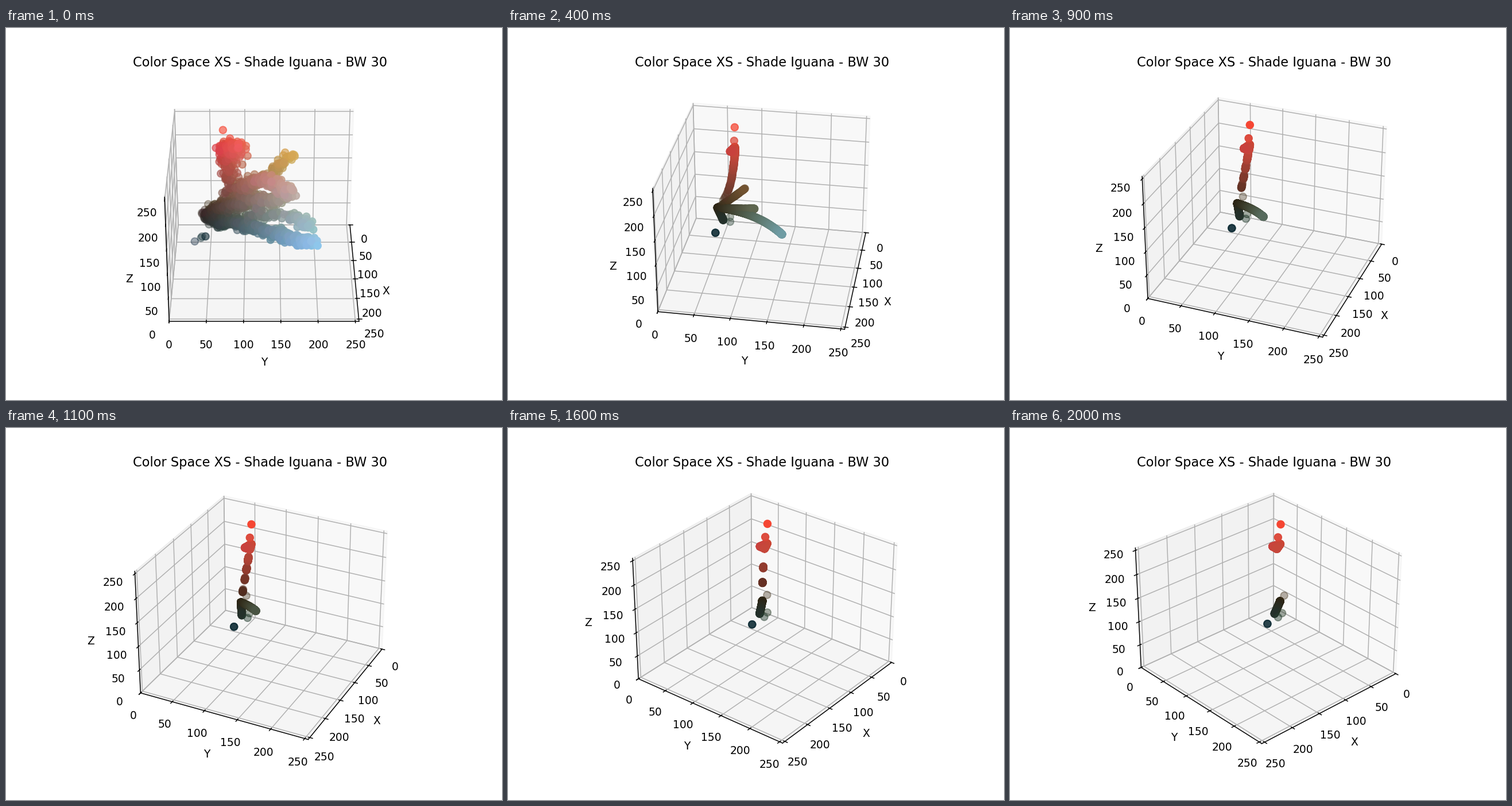
Animation, 864 px wide and 648 px high, one loop 2.1 s. Source, as a matplotlib script:

```python
import numpy as np
import matplotlib.pyplot as plt
from matplotlib.animation import FuncAnimation

FRAMES = 21
rng = np.random.default_rng(7)

# Colours are (R, G, B); a point sits at x=B, y=G, z=R.
DARK = (45, 37, 21)
BLUE_PATH = DARK, (98, 120, 93), (118, 172, 193)
GRAY_PATH = DARK, (78, 82, 66), (128, 144, 112)
GOLD_PATH = DARK, (105, 78, 52), (176, 123, 65)
RED_PATH = DARK, (101, 46, 34), (198, 72, 60)
SHADE_PATH = DARK, (40, 44, 33), (36, 50, 44)


def bezier(path, s):
    a, b, c = np.array(path, float)
    s = s[:, None]
    return (1 - s) ** 2 * a + 2 * s * (1 - s) * b + s ** 2 * c


def scatter(n, size):
    """Noise that is partly shared by the channels, as in brightness."""
    return size * (.7 * rng.normal(size=(n, 1)) + .7 * rng.normal(size=(n, 3)))


def spread(t):
    """Share of the starting scatter that is left at step t."""
    return np.exp(-1.15 * t)


def arm(s, noise, start, path, life=np.inf):
    """Points that fall onto a path, then slide to its dark end."""
    offset = bezier(start, s) + scatter(len(s), noise) - bezier(path, s)

    def at(t):
        reach = np.clip(1 - (t - 2) / life, 0, 1)
        return bezier(path, s * reach) + spread(t) * offset
    return at


def cluster(n, center, noise, corners):
    """Points that gather inside a small triangle of colours."""
    goal = rng.dirichlet([.5] * 3, n) @ np.array(corners, float)
    offset = center + scatter(n, noise) - goal
    return lambda t: goal + spread(t) * offset


def stem(n):
    """Beads below the red cluster; the lower ones drop sooner."""
    top = rng.choice(np.linspace(.4, 1, 5), n, p=np.arange(1, 6) / 15)
    jitter = rng.normal(0, .1, n)
    noise = scatter(n, 6) + (0, 4, 4)

    def at(t):
        left = np.clip(1 - (t - 2) / (17 * top), 0, 1)
        s = np.clip(top * left ** .2 + jitter * np.exp(-t / 6), 0, 1)
        bow = 22 * np.exp(-t / 5) * np.sin(np.pi * s)
        return bezier(RED_PATH, s) + bow[:, None] * (0, 1, .9) + spread(t) * noise
    return at


def loners(points, noise=0):
    points = np.array(points, float)
    offset = scatter(len(points), noise)
    return lambda t: points + spread(t) * offset


groups = [
    arm(rng.beta(.6, .6, 700), 5,
        [(50, 47, 34), (86, 120, 123), (138, 188, 222)], BLUE_PATH, 13),
    arm(rng.uniform(0, 1, 130), 5,
        [(60, 68, 62), (165, 172, 160), (150, 188, 200)], BLUE_PATH, 13),
    arm(rng.uniform(0, 1, 600), 7,
        [(54, 48, 34), (115, 95, 75), (158, 150, 134)], GRAY_PATH, 5.7),
    arm(rng.uniform(0, 1, 240), 6,
        [(125, 90, 72), (212, 125, 108), (182, 162, 152)], GRAY_PATH, 5.7),
    arm(rng.uniform(0, 1, 70) ** .6, 5,
        [(110, 85, 65), (170, 130, 85), (212, 166, 76)], GOLD_PATH, 4.5),
    arm(rng.uniform(0, 1, 260), 4,
        [(48, 46, 32), (48, 56, 48), (52, 70, 66)], SHADE_PATH),
    cluster(260, (219, 82, 70), 8,
            [(201, 65, 62), (204, 70, 51), (198, 72, 60)]),
    stem(110),
    loners([(245, 70, 51), (220, 70, 56), (63, 46, 21),
            (39, 59, 37), (36, 61, 47)]),
    loners([(9, 39, 48)] * 5, 4),
]

fig = plt.figure(figsize=(6.4, 4.8), dpi=135)
ax = fig.add_subplot(projection="3d")
ax.set(xlim=(0, 255), ylim=(0, 255), zlim=(0, 255),
       xlabel="X", ylabel="Y", zlabel="Z")
ax.set_title("Color Space XS - Shade Iguana - BW 30")
dots = None


def draw(i):
    global dots
    if dots is not None:
        dots.remove()
    rgb = np.concatenate([at(i) for at in groups]).clip(0, 255)
    r, g, b = rgb.T
    dots = ax.scatter(b, g, r, c=rgb / 255, s=45)
    ax.view_init(elev=30, azim=50 * i / FRAMES)
    return dots,


anim = FuncAnimation(fig, draw, frames=FRAMES, interval=100,
                     repeat=True, repeat_delay=0)
plt.show()
```
